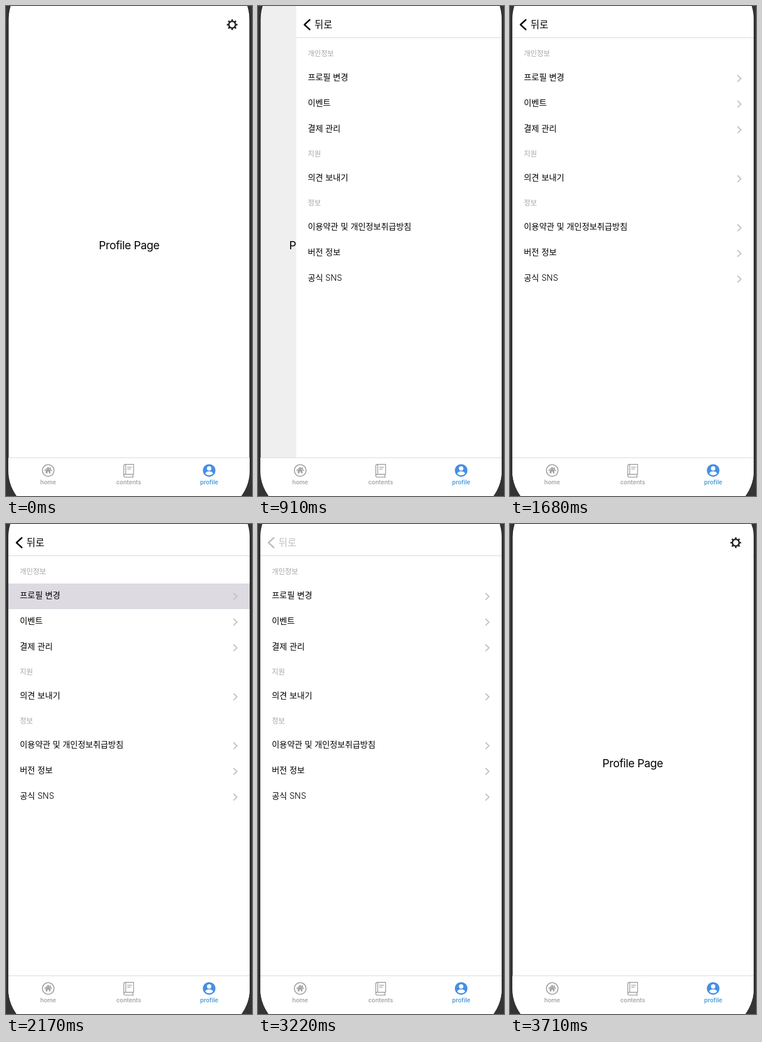
Recreate the animation shown at these times as an HTML page. Size 422x840 px, loop 3.78 s.

```html
<!DOCTYPE html>
<html lang="ko">
<head>
<meta charset="utf-8">
<title>Profile settings</title>
<style>
  html, body { margin: 0; width: 100%; height: 100%; overflow: hidden; background: #343434; }
  svg { display: block; width: 100vw; height: 100vh; }
  text { font-family: Inter, "Noto Sans CJK KR", "Noto Sans CJK", sans-serif; }
  .line { fill: none; stroke-linecap: round; stroke-linejoin: round; }
  .title { font-size: 19px; letter-spacing: -.02em; text-anchor: middle; }
  .back { font-size: 16.6px; font-weight: 350; }
  .section { font-size: 12.2px; font-weight: 350; fill: #a6a6a6; }
  .row { font-size: 14.2px; font-weight: 350; }
  .tab { font-size: 10px; font-weight: 600; text-anchor: middle; fill: #a6a6a6; }
</style>
</head>
<body>
<svg viewBox="0 0 422 840">
  <defs>
    <clipPath id="screen"><rect x="4" y="-50" width="414" height="919" rx="72"/></clipPath>
  </defs>
  <rect width="422" height="840" fill="#343434"/>
  <rect x="4" y="-50" width="414" height="919" rx="72" fill="#fff" stroke="#1c1c1c"/>

  <g clip-path="url(#screen)">
    <g id="profile">
      <text class="title" x="211.2" y="417">Profile Page</text>
      <g fill="none" stroke="#222">
        <circle cx="388" cy="32" r="5.8" stroke-width="2.6"/>
        <circle cx="388" cy="32" r="7.8" stroke-width="2.8" pathLength="16"
                stroke-dasharray=".9 1.1" stroke-dashoffset=".45"/>
      </g>
    </g>
    <rect id="shade" width="422" height="840"/>

    <g id="menu">
      <rect x="4" width="430" height="840" fill="#fff"/>
      <path d="M4 54.3H434" stroke="#d6d6d6"/>
      <g id="back">
        <path class="line" d="M27 23.7L18 32L27 40.3" stroke="#000" stroke-width="2.6"/>
        <text class="back" x="35.3" y="38">뒤로</text>
      </g>
      <rect id="highlight" x="4" y="102" width="414" height="44" fill="#dddae1"/>
      <g id="list"></g>
    </g>

    <g id="tabs">
      <rect y="774" width="422" height="66" fill="#fff"/>
      <path d="M0 774.5H422" stroke="#d8d8d8"/>
      <g class="line" stroke="#a0a0a0" stroke-width="1.6">
        <circle cx="72.4" cy="796.2" r="10"/>
        <path d="M66.6 796.4L72.4 791L78.2 796.4M76.3 791.5V793.5"/>
        <path d="M69 796.3L72.4 793.2L75.8 796.3V800.8H74V797.6H70.8V800.8H69Z" fill="#a0a0a0" stroke-width="1"/>
        <path d="M218.8 802.8V785.8H204.8Q202 785.8 202 788.6V805Q202 807.6 204.8 807.6H218.8M218.8 802.8H204.6Q202 802.8 202 805.2M217.6 803V807.4M205.4 786V802.6" stroke-width="1.4"/>
        <path d="M208.4 790.6H215.6M208.4 793.8H213.6" stroke-width="1.3"/>
      </g>
      <circle cx="348.5" cy="796.2" r="10.8" fill="#458fe6"/>
      <circle cx="348.5" cy="792.8" r="3.8" fill="#fff"/>
      <path d="M341.8 801.8Q342.8 797.8 348.5 797.8T355.2 801.8Q352.5 804.6 348.5 804.6T341.8 801.8Z" fill="#fff"/>
      <text class="tab" x="72.4" y="820">home</text>
      <text class="tab" x="210.5" y="820">contents</text>
      <text class="tab" x="348.6" y="820" style="fill:#4a9bd6">profile</text>
    </g>
  </g>
</svg>
<script>
  const LOOP = 3780, WIDTH = 414, DECAY = 0.0137;
  const PUSH = 772, PRESS_ROW = 2170, RELEASE_ROW = 2310, PRESS_BACK = 3220, POP = 3335;
  const $ = id => document.getElementById(id);

  const sections = [
    [82, '개인정보', ['프로필 변경', '이벤트', '결제 관리']],
    [254, '지원', ['의견 보내기']],
    [338, '정보', ['이용약관 및 개인정보취급방침', '버전 정보', '공식 SNS']],
  ];

  $('list').innerHTML = sections.map(([y, name, rows]) =>
    `<text class="section" x="23.8" y="${y + 4.4}">${name}</text>` +
    rows.map((label, i) => {
      const mid = y + 40 + i * 44;
      return `<text class="row" x="23.8" y="${mid + 5.2}">${label}</text>
        <path class="line" d="M390.8 ${mid - 3}l5.4 5.2l-5.4 5.2" stroke="#c2c2c2" stroke-width="1.9"/>`;
    }).join('')).join('');

  // Heavily damped spring: the remaining distance shrinks exponentially.
  const remaining = elapsed => elapsed < 0 ? 1 : Math.exp(-DECAY * elapsed);

  function menuOffset(t) {
    const x = WIDTH * (t < POP ? remaining(t - PUSH) : 1 - remaining(t - POP));
    return x < 0.3 ? 0 : x;
  }

  function backOpacity(t) {
    if (t < PRESS_BACK) return 1;
    return 0.25 + 0.75 * Math.min(1, Math.max(0, (t - POP) / 200));
  }

  function draw(now) {
    const t = now % LOOP;
    const offset = menuOffset(t);
    const shown = 1 - offset / WIDTH;
    $('menu').setAttribute('transform', `translate(${offset})`);
    $('profile').setAttribute('transform', `translate(${-0.3 * WIDTH * shown})`);
    $('shade').setAttribute('opacity', 0.075 * shown);
    $('back').setAttribute('opacity', backOpacity(t));
    $('highlight').setAttribute('opacity', t >= PRESS_ROW && t < RELEASE_ROW ? 1 : 0);
    requestAnimationFrame(draw);
  }

  draw(0);
</script>
</body>
</html>
```
